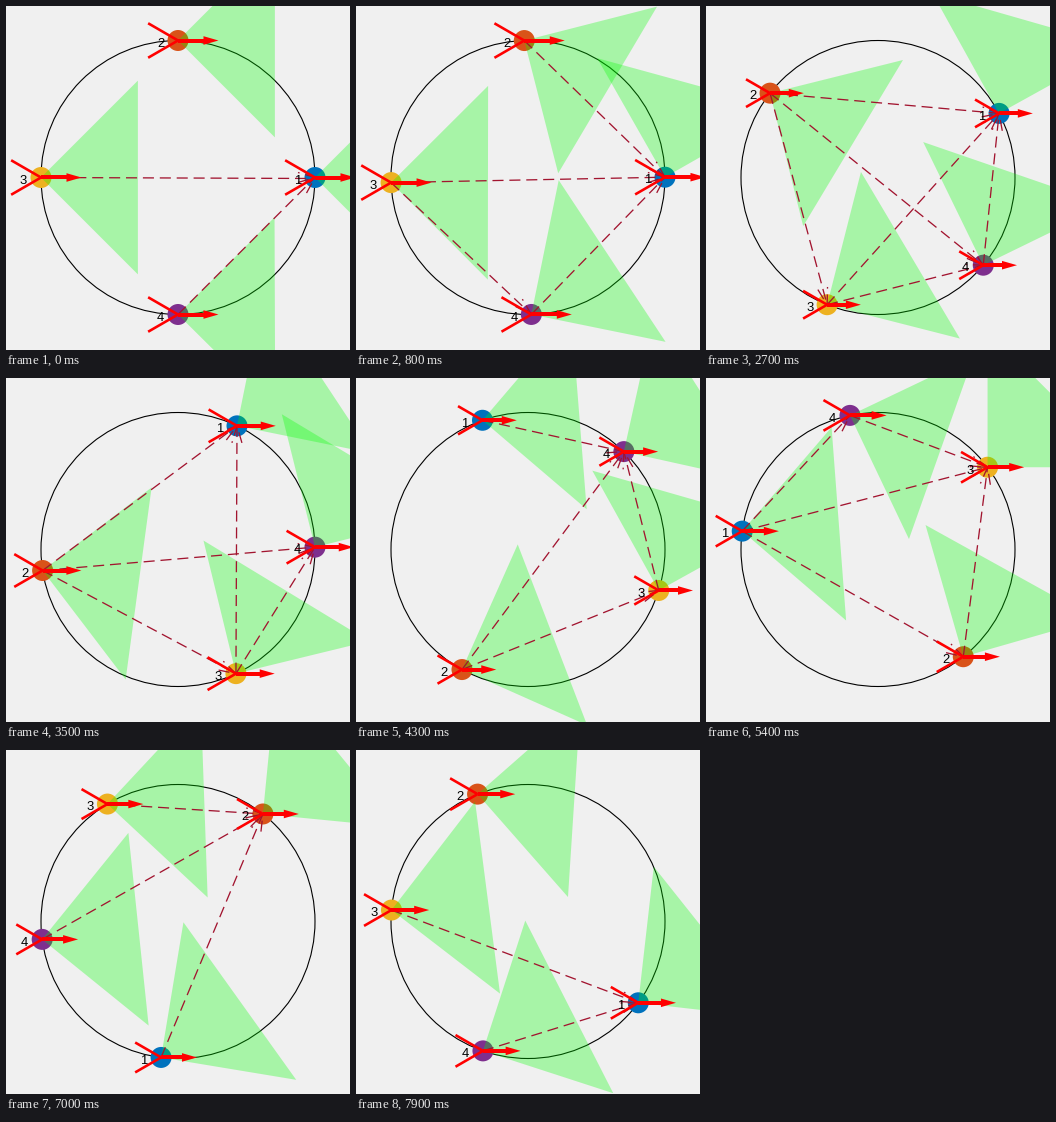
Animation, 344 px wide and 344 px high, one loop 8000 ms. Source, as a matplotlib script:

```python
import numpy as np
import matplotlib.pyplot as plt
from matplotlib.animation import FuncAnimation
from matplotlib.patches import Circle, Polygon

SIZE = 344
CX, CY, R = 172, 171.5, 137
PX = 0.72                       # points per pixel at 100 dpi
HALF_VIEW = 45
COLORS = ["#0072BD", "#D95319", "#EDB120", "#7E2F8E"]
EDGE = "#A2142F"

# Key steps, with each agent's place on the ring and viewing direction (degrees)
KEYS = np.array([0, 9, 15, 26, 42, 53, 69, 78], float)
PLACE = np.array([
    [0, 0.6, 3.6, 27.9, 109.4, 172.3, 262.9, 323.6],
    [90, 93, 100.5, 142, 241.2, 308.5, 411.7, 471.6],
    [180, 184.5, 197.4, 248.2, 342.6, 396.9, 481, 535.2],
    [270, 273, 281.8, 320.2, 405.6, 461.8, 547.5, 610.8]])
VIEW = np.array([
    [0, 92, 127.6, 74, 4.5, 4.3, 35.6, 38.5],
    [0, -37, -46, -31, 21, 61, 39.4, -3.7],
    [0, 0, 0.7, 30.7, 74, 45, 2, 7.4],
    [0.2, 41, 55.5, 71, 32.5, -19.5, 6, 27]])


def smooth(values, s, start=None):
    """Cubic Hermite curve through the key values."""
    slope = np.gradient(values, KEYS)
    if start is not None:
        slope[0] = start
    i = min(np.searchsorted(KEYS, s, side="right") - 1, len(KEYS) - 2)
    d = KEYS[i + 1] - KEYS[i]
    u = (s - KEYS[i]) / d
    return ((1 + 2 * u) * (1 - u) ** 2 * values[i] + u * (1 - u) ** 2 * d * slope[i]
            + u * u * (3 - 2 * u) * values[i + 1] + u * u * (u - 1) * d * slope[i + 1])


def unit(deg):
    a = np.radians(deg)
    return np.array([np.cos(a), -np.sin(a)])


def line(points, color, width, z, **kw):
    xs, ys = zip(*points)
    ax.plot(xs, ys, color=color, lw=width * PX, zorder=z, **kw)


def sees(p, q, view):
    dx, dy = q - p
    off = np.degrees(np.arctan2(-dy, dx)) - view
    return abs((off + 180) % 360 - 180) < HALF_VIEW - 0.05


def sight_line(p, q):
    d = (q - p) / np.hypot(*(q - p))
    n = np.array([-d[1], d[0]])
    dash = dict(dashes=(8.5, 4.5), dash_capstyle="butt")
    line([p, q], EDGE, 1.3, 4, **dash)
    back = q - 17 * d
    line([back + 5 * n, q, back - 5 * n], EDGE, 1.3, 4, **dash)


def body_axes(p, length):
    for deg in (150, 210):
        line([p, p + length * unit(deg)], "red", 2.6, 5, solid_capstyle="butt")
    tip = p + [length + 6, 0]
    line([p, tip - [11, 0]], "red", 4, 5, solid_capstyle="butt")
    ax.add_patch(Polygon([tip, tip + [-15, -4.3], tip + [-15, 4.3]],
                         fc="red", ec="none", zorder=5))


def draw(frame):
    ax.clear()
    ax.set_xlim(0, SIZE)
    ax.set_ylim(SIZE, 0)
    ax.axis("off")

    s = max(0, frame - 1)
    pos = [np.array([CX, CY]) + R * unit(smooth(v, s, 0)) for v in PLACE]
    views = [smooth(v, s) for v in VIEW]
    length = 0.089 * np.hypot(*np.ptp(pos, axis=0))

    ax.add_patch(Circle((CX, CY), R, fill=False, ec="black", lw=1.1 * PX, zorder=1))
    for i, (p, view) in enumerate(zip(pos, views)):
        ax.add_patch(Circle(p, 10.5, fc=COLORS[i], ec="none", zorder=2))
        cone = [p, p + R * unit(view + HALF_VIEW), p + R * unit(view - HALF_VIEW)]
        ax.add_patch(Polygon(cone, fc="#00FF00", ec="none", alpha=0.3, zorder=3))
        for j, q in enumerate(pos):
            if i != j and sees(p, q, view):
                sight_line(p, q)
        body_axes(p, length)
        ax.text(p[0] - 17.5, p[1] + 6.3, str(i + 1), fontsize=13 * PX, color="black",
                family="Liberation Sans", ha="center", va="baseline",
                zorder=6, clip_on=True)
    return []


fig = plt.figure(figsize=(SIZE / 100, SIZE / 100), dpi=100, facecolor="#F0F0F0")
ax = fig.add_axes([0, 0, 1, 1])
anim = FuncAnimation(fig, draw, frames=80, interval=100, repeat=True, repeat_delay=0)
plt.show()
```
